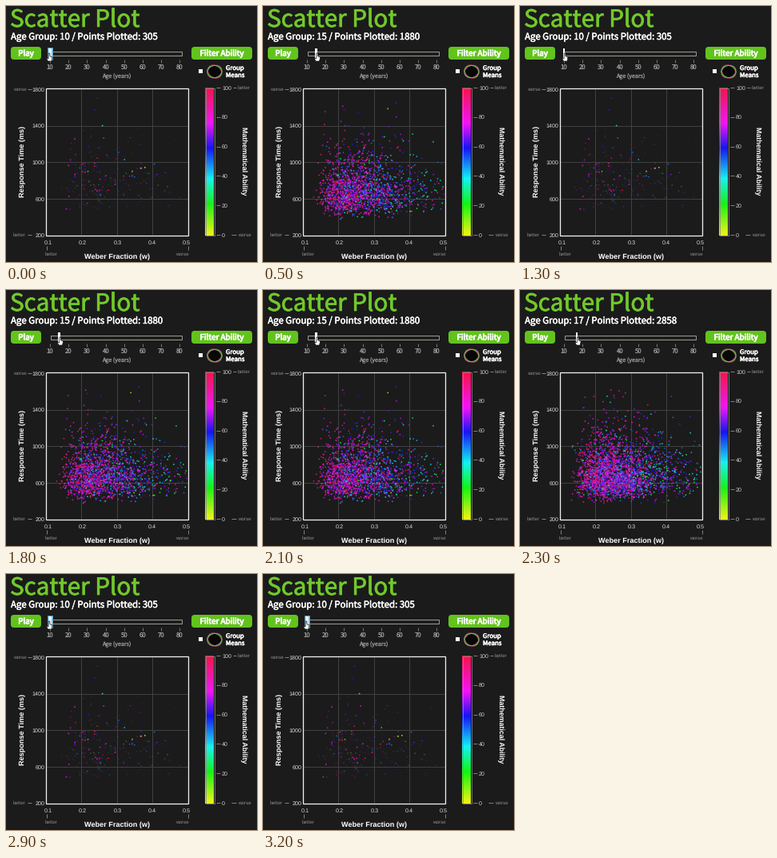
Animation, 314 px wide and 320 px high, one loop 3300 ms. Source, as a matplotlib script:

```python
import matplotlib.pyplot as plt
import numpy as np
from matplotlib import patheffects
from matplotlib.animation import FuncAnimation
from matplotlib.colors import hsv_to_rgb
from matplotlib.patches import Ellipse, FancyBboxPatch, Polygon, Rectangle

W, H, DPI = 314, 320, 100
FRAMES, INTERVAL = 33, 100
PT = 72 / DPI  # points per pixel
BG, GREEN, GRAY = "#1b1b1b", "#62c31d", "#8c8c8c"
HUMAN, ARIAL = "Noto Sans CJK JP", "Liberation Sans"

HOLD, LEAD = 520, 300  # ms per age group, head start of the first
COUNTS = {10: 305, 15: 1880, 17: 2858}
AGES = list(COUNTS)

plt.rcParams["text.hinting"] = "none"
fig = plt.figure(figsize=(W / DPI, H / DPI), dpi=DPI, facecolor=BG)
ax = fig.add_axes([0, 0, 1, 1])
ax.axis("off")


def text(x, y, s, size, color="white", font=ARIAL, heavy=0, va="baseline", **kw):
    t = ax.text(x, y, s, fontsize=size * PT, color=color, family=font, va=va, **kw)
    if heavy:
        t.set_path_effects([
            patheffects.Stroke(linewidth=heavy * PT, foreground=color),
            patheffects.Normal(),
        ])
    return t


def line(x0, y0, x1, y1, color=GRAY, width=0.9):
    ax.plot([x0, x1], [y0, y1], color=color, lw=width * PT, zorder=1,
            solid_capstyle="butt")


def box(x0, y0, x1, y1, face="none", edge="none", width=1, z=2):
    return ax.add_patch(Rectangle((x0, y0), x1 - x0, y1 - y0, facecolor=face,
                                  edgecolor=edge, lw=width * PT, zorder=z))


def button(x0, x1, label):
    ax.add_patch(FancyBboxPatch((x0, 51), x1 - x0, 16, facecolor=GREEN, lw=0,
                                boxstyle="round,pad=0,rounding_size=4"))
    text((x0 + x1) / 2, 62.3, label, 9.8, font=HUMAN, heavy=0.75, ha="center")


def score_color(v):
    """Map 0..1 from yellow through green, blue and magenta to red."""
    hue = np.interp(v, [0, 0.2, 0.4, 0.6, 0.75, 1], [60, 116, 185, 243, 297, 346])
    return hsv_to_rgb(np.stack([hue / 360, np.full_like(hue, 0.91),
                                np.full_like(hue, 0.95)], -1))


def plot_x(w):
    return 50 + (w - 0.1) * 444


def plot_y(ms):
    return 286.5 - (ms - 200) * 0.1141


def slider_x(age):
    return 55 + (age - 10) * 2.32


# Header and buttons
text(5, 26, "Scatter Plot", 29.6, "#71c92b", HUMAN, heavy=0.7)
subtitle = text(6, 42, "", 11.4, font=HUMAN, heavy=0.45)
button(6, 44, "Play")
button(232, 308, "Filter Ability")

# Slider
box(55.5, 56.5, 219.5, 61.5, "#1e1e1e", "#a8a8a0", 0.9)
for age in range(10, 90, 10):
    x = slider_x(age)
    line(x, 67, x, 71, "#808080")
    text(x, 79.3, str(age), 7.8, "#a4a4a4", HUMAN, ha="center")
text(138, 89, "Age (years)", 7.1, "#9c9c9c", HUMAN, ha="center")

# Group means toggle
box(241, 79, 246, 84, "white")
ax.add_patch(Ellipse((261, 82), 20, 17, facecolor="#080808"))
for tilt, color in ((40, "#b03a3a"), (-25, "#e23cc8"), (8, "#4ed23a")):
    ax.add_patch(Ellipse((261, 82), 18.5, 15, angle=tilt, fill=False,
                         edgecolor=color, lw=PT, zorder=3))
text(275, 80, "Group", 7.8, font=HUMAN, heavy=0.5)
text(275, 89, "Means", 7.8, font=HUMAN, heavy=0.5)

# Plot frame, grid and labels
for w in (0.2, 0.3, 0.4):
    line(plot_x(w), 103, plot_x(w), 286, "#454545")
for ms in (600, 1000, 1400):
    line(50, plot_y(ms), 228, plot_y(ms), "#454545")
box(50.2, 103.2, 228, 286.6, edge="#eeeeee", width=1.3, z=6)
for ms in range(200, 2000, 400):
    text(48.2, plot_y(ms) + 2.6, str(ms), 7.2, "#d8d8d8", ha="right")
for i in range(5):
    text(53 + 43.2 * i, 298, f"0.{i + 1}", 7.3, "#d8d8d8", ha="center")
for y, label in ((104, "worse"), (286, "better")):
    text(8.8, y + 2, label, 6.3, GRAY)
    line(26.5, y, 31.5, y)
for x, lx, label in ((50.5, 57, "better"), (227.5, 220.5, "worse")):
    line(x, 300, x, 305)
    text(lx, 312, label, 6.3, GRAY, ha="center")
bold = dict(weight="bold", ha="center")
text(139, 316, "Weber Fraction (w)", 9.15, **bold)
text(21, 194, "Response Time (ms)", 9.15, rotation=90, va="center", **bold)
text(297, 194, "Mathematical Ability", 8.9, rotation=270, va="center", **bold)

# Colour scale
ax.imshow(score_color(np.linspace(1, 0, 184))[:, None], extent=(249, 260, 287, 102),
          aspect="auto", zorder=2)
ax.set_xlim(0, W)
ax.set_ylim(H, 0)
box(249.5, 102.5, 260.5, 286.5, edge="#8a8a8a", width=0.8, z=3)
for v in range(0, 120, 20):
    y = 286 - v * 1.84
    line(263, y, 268, y)
    text(270, y + 2.6, str(v), 7.1, "#cccccc")
for x, y, label in ((284, 102, "better"), (282, 286, "worse")):
    line(x, y, 288, y)
    text(289.7, y + 2, label, 6.3, GRAY)


def cloud(age):
    """Draw the hidden scatter of one age group."""
    rng = np.random.default_rng(100 + age)
    n, young = COUNTS[age], age == 10
    w = 0.08 + rng.lognormal(np.log(0.18), 0.4, n * 2)
    ms = 250 + rng.lognormal(np.log(560 if young else 440), 0.4, n * 2)
    keep = (w > 0.12) & (w < 0.497) & (ms < 1720)
    w, ms = w[keep][:n], ms[keep][:n]
    v = 0.72 - 0.9 * (w - 0.25) + rng.normal(0, 0.26 if young else 0.18, n)
    alpha = np.full(n, 0.8)
    if young:
        # Only some of the slower answers stand out
        lit = rng.random(n) < np.clip((ms - 650) / 1200, 0.02, 0.6)
        alpha = np.where(lit, 0.85, rng.uniform(0.05, 0.35, n))
    rgba = np.column_stack([score_color(np.clip(v, 0.05, 1)), alpha])
    return ax.scatter(plot_x(w), plot_y(ms), s=(1.8 * PT) ** 2, c=rgba,
                      linewidths=0, zorder=4, visible=False)


clouds = {age: cloud(age) for age in AGES}

# Slider handle and pointing hand
glow = box(0, 51.5, 6, 67, "#bfdcec", "#4f9ac8", z=7)
handle = box(0, 53, 2.4, 67, "white", z=8)
HAND = np.array([(-0.8, 0), (0.8, 0), (1, 3.8), (4, 5), (3, 10), (-1.6, 10),
                 (-3.6, 6), (-0.9, 6.8)])
hand = ax.add_patch(Polygon(HAND, facecolor="white", edgecolor="#111111",
                            lw=0.7 * PT, zorder=9))


def step(i):
    stop = (i * INTERVAL + LEAD) // HOLD
    age = AGES[stop % len(AGES)]
    resting = stop % (2 * len(AGES)) == 0  # released between the two rounds
    for a, c in clouds.items():
        c.set_visible(a == age)
    subtitle.set_text(f"Age Group: {age} / Points Plotted: {COUNTS[age]}")
    x = slider_x(age)
    handle.set_x(x - 1.2)
    glow.set_x(x - 3)
    glow.set_visible(resting)
    hand.set_xy(HAND + (x + (-1 if resting else 1), 59))
    return [subtitle, handle, glow, hand, *clouds.values()]


anim = FuncAnimation(fig, step, frames=FRAMES, interval=INTERVAL, repeat=True,
                     repeat_delay=0, blit=False)
plt.show()
```
